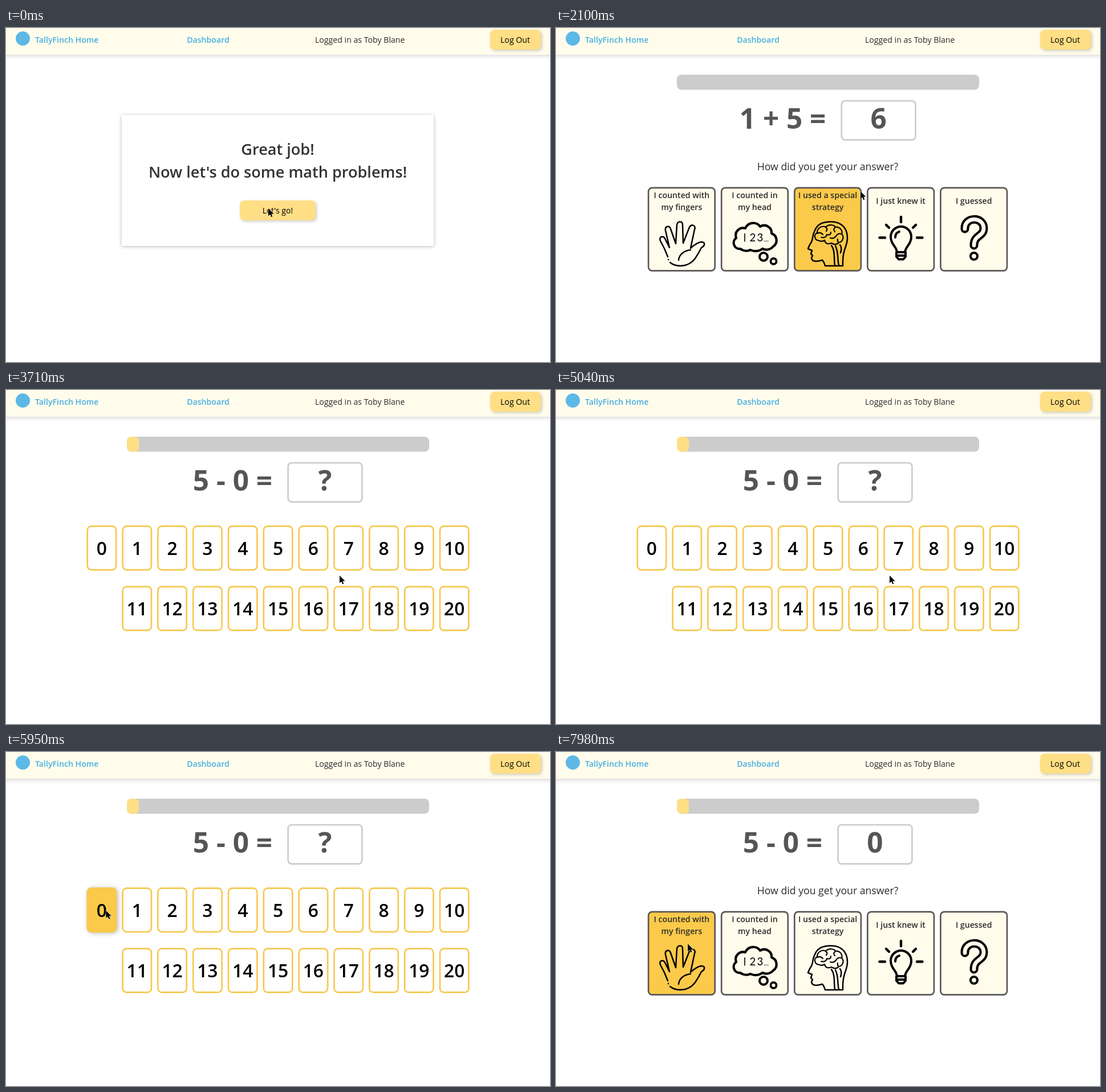
An HTML page for the animation above (8000 ms loop, 954 by 587 pixels).

```html
<!DOCTYPE html>
<html lang="en">
<head>
<meta charset="utf-8">
<title>Math practice</title>
<style>
html, body { margin: 0; width: 100%; height: 100%; overflow: hidden; background: #fff; }
svg { display: block; width: 100%; height: 100%; }
text { font-family: "Open Sans", sans-serif; font-size: 14.13px; fill: #2b2b2b; white-space: pre; }
.mid { text-anchor: middle; }
.semi { font-weight: 600; }
.link { font-weight: 600; fill: #48afe2; }
.black { fill: #000; }
.title { font-size: 27.1px; font-weight: 600; fill: #333; }
.sum { font-size: 49.47px; font-weight: 700; fill: #555; }
.ask { font-size: 17.67px; }
.header { fill: #fffcec; filter: drop-shadow(0 3px 3px rgba(0,0,0,.13)); }
.button { fill: #ffdf85; filter: drop-shadow(2px 2px 2.5px rgba(0,0,0,.2)); }
.panel { fill: #fff; filter: drop-shadow(0 1px 3px rgba(0,0,0,.28)); }
.key rect { fill: #fff; stroke: #f5c950; stroke-width: 2.65; }
.key text { font-size: 31.8px; font-weight: 600; fill: #000; }
.key.on rect { fill: #fcca4a; filter: drop-shadow(2px 1px 4px rgba(0,0,0,.25)); }
.card { --face: #fffcec; }
.card.on { --face: #fcca4a; }
.card > rect { fill: var(--face); stroke: #5a5656; stroke-width: 2.65; }
.icon { fill: none; stroke: #000; stroke-linecap: round; stroke-linejoin: round; }
.icon text { font: 18.5px Lato, sans-serif; fill: #000; stroke: none; }
</style>
</head>
<body>
<svg id="stage" viewBox="0 0 954 587"></svg>
<script>
const LOOP = 8000, STEP = 70, HOVER_LAG = 35;
const stage = document.getElementById('stage');

const text = (x, y, s, cls = '') => `<text x="${x}" y="${y}" class="${cls}">${s}</text>`;
const rect = (x, y, w, h, r = 0, attrs = '') =>
  `<rect x="${x}" y="${y}" width="${w}" height="${h}" rx="${r}" ${attrs}/>`;
const path = (d, width, attrs = '') => `<path d="${d}" stroke-width="${width}" ${attrs}/>`;
const ring = (x, y, r, width) => `<circle cx="${x}" cy="${y}" r="${r}" stroke-width="${width}"/>`;

const keys = Array.from({ length: 21 }, (_, n) => ({
  x: 141.4 + (n < 11 ? n : n - 10) * 61.83, y: n < 11 ? 238 : 344.3, w: 53, h: 79
}));
const drawKey = (k, n) => `<g class="key">${rect(k.x + 1.3, k.y + 1.3, 50.4, 76.8, 7)}` +
  text(k.x + 26.5, k.y + 52, n, 'mid') + '</g>';

const icons = [
  // hand
  path('M196 402Q191 388 183 374Q181 368 185 367Q189 366 191 370L199 386L192 356Q191 350 195 349Q199 348 201 353L210 379L212 346Q213 340.5 217.5 340.5Q222 340.5 222 346L223 378L234 350Q237 345 241 347Q245 349 243 354L236 387Q247 377 255 376Q261 376 260 381Q259 384 255 386Q250 396 244 405Q234 418 218 418Q207 418 200 412M197 407V407.2M215 408C216 397 226 391 236 390', 2.5),
  // thought bubble
  path('M323 388A10.5 10.5 0 0 1 316 369A13 13 0 0 1 332 352A15 15 0 0 1 358 349A13 13 0 0 1 378 361A13 13 0 0 1 381 384A16 16 0 0 1 362 388A17 14 0 0 1 341 390A16 14 0 0 1 323 388Z', 4.2) +
  ring(364, 402, 7, 4) + ring(381.5, 410, 5, 3.8) +
  path('M331 361.5V375M365.5 374.5h.1M368.5 374.5h.1M371.5 374.5h.1', 1.6) +
  text(339.5, 375.3, '2') + text(352.5, 375.3, '3'),
  // head with brain
  path('M454 356C458 344 470 340.5 482 340.5C501 340.5 511 352 511 369C511 385 502 388 503 417M454 356C450 362 451 370 448 376Q443 384 442 388L449 391L447 397L450 400L448 404C449 411 456 411 467 408Q470 411 472 418H503M483 382C490 392 487 407 489 417M490 383C496 395 493 407 496 417M498 381Q502 386 499 395', 2.5) +
  path('M462 374C452 373 452 362 458 360C458 350 468 347 473 350C479 344 488 346 490 350C498 349 503 356 501 362C506 367 503 376 496 377Q491 383 483 378Q473 382 471 373Q467 376 462 374ZM473 350Q477 353 474 357M458 361Q464 358 468 363M465 368Q473 370 475 363Q482 365 482 359M490 350Q485 354 489 358M501 362Q494 360 491 366Q487 371 481 369M496 377Q493 375 494 371', 2.2),
  // light bulb
  path('M598 394C597 383 587 381 587 367A18 18 0 0 1 623 367C623 381 613 383 612 394ZM597 394V402L601 406.5H609L613 402V394M597 400H613M595 368Q595 360 602 358', 4) +
  path('M605 332V341M579 346L584 351M631 346L626 351M567.5 368.5H577M633 368.5H642.5', 4.4),
  // question mark
  [15, 6.8].map((w, i) => path('M717 353C716 331 750 331 750 352C750 367 733 363 733 382', w,
    i ? 'style="stroke:var(--face)"' : '')).join('') + ring(733, 401, 6, 4.2)
];
const answers = [['I counted with', 'my fingers'], ['I counted in', 'my head'],
  ['I used a special', 'strategy'], ['I just knew it'], ['I guessed']];
const cards = answers.map((_, i) => ({ x: 160.8 + i * 128.08, y: 279.5, w: 119.2, h: 148.4 }));
const drawCard = (c, i) => `<g class="card">${rect(c.x + 1.3, c.y + 1.3, 116.6, 145.8, 6.5)}` +
  answers[i].map((s, row) => text(c.x + 59.6, (answers[i][1] ? 298.5 : 309) + row * 21.2, s, 'mid semi')).join('') +
  `<g class="icon">${icons[i]}</g></g>`;

stage.innerHTML =
  rect(-10, -10, 974, 57, 0, 'class="header"') +
  '<circle cx="29.5" cy="18.5" r="12.5" fill="#5db8e6"/>' +
  text(51, 25.5, 'TallyFinch Home', 'link') +
  text(354.5, 25.5, 'Dashboard', 'link mid') +
  text(542, 25.5, 'Logged in as Toby Blane') +
  rect(849, 3, 89, 35, 8, 'class="button"') + text(893, 25.5, 'Log Out', 'mid black') +
  '<g id="intro">' + rect(203, 153, 547, 230, 1, 'class="panel"') +
  text(476.5, 223.3, 'Great job!', 'mid title') +
  text(476.5, 263.3, "Now let's do some math problems!", 'mid title') +
  rect(410, 303, 133, 35, 8, 'class="button"') + text(476.5, 326, "Let's go!", 'mid black') + '</g>' +
  '<g id="quiz">' + rect(212, 82, 530, 26.5, 8, 'fill="#ccc"') +
  rect(212, 82, 0, 26.5, 8, 'id="fill" fill="#ffdf85"') +
  text(0, 177.3, '', 'sum') + '<g id="box">' +
  rect(1.3, 128, 129.8, 68.6, 6.5, 'fill="#fff" stroke="#ccc" stroke-width="2.65"') +
  text(66.2, 177.3, '', 'sum mid') + '</g></g>' +
  `<g id="pad">${keys.map(drawKey).join('')}</g>` +
  '<g id="survey">' + text(476.5, 250, 'How did you get your answer?', 'mid ask') +
  cards.map(drawCard).join('') + '</g>' +
  '<path id="cursor" d="M0 0V13.4L3.1 10.6L5.2 15.2L7.4 14.2L5.3 9.7H9.5Z" stroke="#fff" stroke-width="1" paint-order="stroke"/>';

const $ = id => document.getElementById(id);
const [sumText, boxText] = stage.querySelectorAll('.sum');
const keyNodes = [...stage.querySelectorAll('.key')];
const cardNodes = [...stage.querySelectorAll('.card')];

// time, x, y of the pointer tip
const trail = [
  [0, 460, 317], [350, 460, 317], [490, 465, 318], [1400, 465, 318], [1820, 519, 272],
  [1890, 519, 272], [1960, 534, 287], [2870, 534, 287], [2940, 551, 291], [3010, 564, 300],
  [3290, 585, 326], [5040, 585, 326], [5180, 505, 302], [5320, 362, 262], [5390, 307, 257],
  [5530, 250, 256], [5740, 208, 266], [5810, 190, 270], [6020, 168, 283], [6440, 168, 283],
  [6510, 184, 297], [7280, 184, 297], [7560, 236, 388], [7770, 231, 337], [LOOP, 231, 337]
];
function pointer(t) {
  const i = Math.max(1, trail.findIndex(p => p[0] >= t));
  const [t0, x0, y0] = trail[i - 1], [t1, x1, y1] = trail[i];
  const k = Math.max(0, (t - t0) / (t1 - t0));
  return [x0 + (x1 - x0) * k, y0 + (y1 - y0) * k];
}

const show = (id, on) => $(id).setAttribute('display', on ? 'inline' : 'none');
function hover(nodes, areas, [x, y]) {
  areas.forEach((a, i) => nodes[i].classList.toggle('on',
    x >= a.x && x < a.x + a.w && y >= a.y && y < a.y + a.h - .5));
}

function render(time) {
  const t = Math.floor(time / STEP) * STEP;
  const second = t >= 3430;
  const survey = t >= 2100 && !second || t >= 6650;
  const quiz = t >= 350;
  show('intro', !quiz);
  show('quiz', quiz);
  show('pad', quiz && !survey);
  show('survey', survey);

  sumText.textContent = second ? '5 - 0 =' : '1 + 5 =';
  sumText.setAttribute('x', second ? 327.8 : 321.8);
  $('box').setAttribute('transform', `translate(${second ? 493.3 : 499.4} 0)`);
  boxText.textContent = survey ? (second ? '0' : '6') : '?';
  const grow = Math.min(1, Math.max(0, (t - 3430) / 280));
  $('fill').setAttribute('width', 21.2 * (1 - (1 - grow) ** 2));

  const [x, y] = pointer(t);
  $('cursor').setAttribute('transform', `translate(${x} ${y})`);
  const late = pointer(Math.max(0, t - HOVER_LAG));
  hover(keyNodes, keys, late);
  hover(cardNodes, cards, late);
}

const start = performance.now();
function tick() {
  render((performance.now() - start) % LOOP);
  requestAnimationFrame(tick);
}
tick();
</script>
</body>
</html>
```
